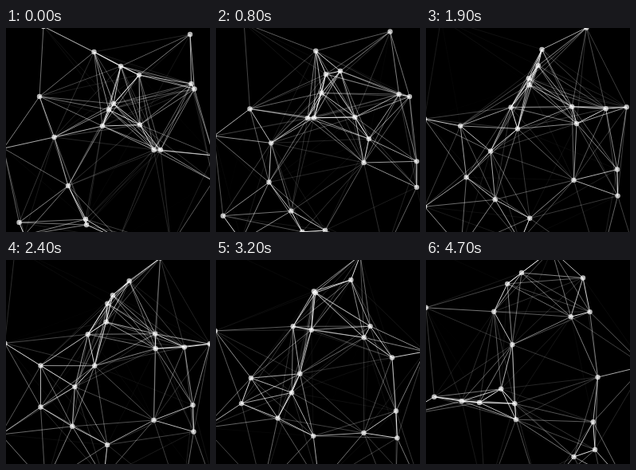
Recreate the animation shown at these times as an HTML page with a canvas. Size 256 by 256 pixels, loop 4800 ms.

```html
<!DOCTYPE html>
<html lang="en">
<head>
<meta charset="utf-8">
<title>Drifting network</title>
<style>
html, body { margin: 0; width: 100%; height: 100%; overflow: hidden; background: #000; }
canvas { display: block; width: 100vw; height: 100vh; }
</style>
</head>
<body>
<canvas width="256" height="256"></canvas>
<script>
const ctx = document.querySelector('canvas').getContext('2d');
const LOOP = 4800, STEP = 100, REACH = 140, SPEED = 20;

// Start x, start y, heading in quarter turns: 0 right, 1 down, 2 left, -1 up
const nodes = [
  [47, -2, -1.74], [110.5, 30, -.08], [144, 48, 1.38], [167, 59, -1.69],
  [135, 95, -1.16], [129, 102.5, 1.37], [121, 123, -1.38], [168, 121.5, -.6],
  [185.5, 153, 1], [194, 153, -1.13], [232.5, 70, 1.18], [236.5, 76.5, .6],
  [231, 8, -1.78], [42, 86, .97], [60.5, 137, .46], [78, 198, -1.72],
  [16.5, 244, -1.48], [100, 240, -1.35], [101, 247, .55], [142, 265, -1.31],
  [-3, 151, -.97], [260.5, 160, 1.54], [260, 192, 1.51], [207, 273, .72],
  [288, 338, -1.4], [23, 260, .45]
];

// Every node covers the same |dx| + |dy| per second, split by its heading.
function place([x, y, heading], seconds) {
  const dx = 1 - Math.abs(heading);
  const dy = Math.sign(heading) * (1 - Math.abs(dx));
  return [x + dx * SPEED * seconds, y + dy * SPEED * seconds];
}

function link([x, y], [u, v]) {
  const alpha = Math.min(1, 1.3 * (1 - Math.hypot(u - x, v - y) / REACH));
  if (alpha <= 0) return;
  ctx.strokeStyle = `rgba(255,255,255,${alpha})`;
  ctx.beginPath();
  ctx.moveTo(x, y);
  ctx.lineTo(u, v);
  ctx.stroke();
}

function dot([x, y]) {
  ctx.beginPath();
  ctx.arc(x, y, 3.2, 0, Math.PI * 2);
  ctx.fill();
}

function draw(seconds) {
  ctx.fillStyle = '#000';
  ctx.fillRect(0, 0, 256, 256);
  const points = nodes.map(node => place(node, seconds));

  ctx.lineWidth = 0.9;
  points.forEach((p, i) => points.slice(i + 1).forEach(q => link(p, q)));

  ctx.fillStyle = 'rgba(255,255,255,0.7)';
  points.forEach(dot);
}

const start = performance.now();
function tick() {
  const time = (performance.now() - start) % LOOP;
  draw(Math.floor(time / STEP) * STEP / 1000);
  requestAnimationFrame(tick);
}
tick();
</script>
</body>
</html>
```
